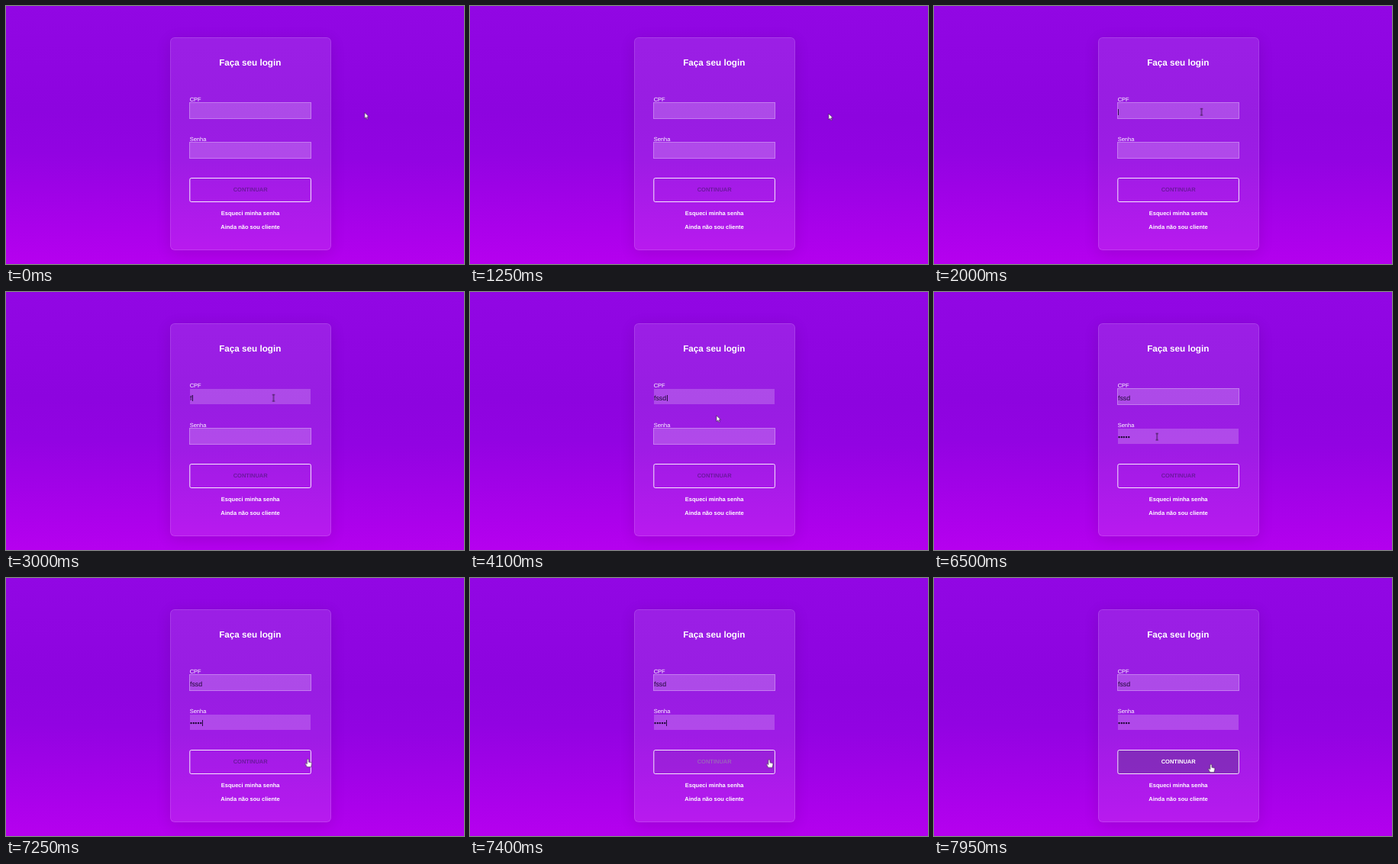
An HTML page that plays this animation: 600 px wide and 338 px high, repeating every 8 s.

```html
<!DOCTYPE html>
<html lang="pt-BR">
<head>
<meta charset="utf-8">
<title>Faça seu login</title>
<style>
html, body { margin: 0; width: 100%; height: 100%; overflow: hidden; }
body {
  position: relative;
  background: linear-gradient(181deg, #9207e4, #8d04df 42%, #9203e2 58%, #b600ef);
  font-family: "Liberation Sans", Arial, sans-serif;
}
svg { position: absolute; left: 0; top: 0; }
.card {
  position: absolute; left: 215px; top: 41px; width: 211px; height: 279px;
  box-sizing: border-box; border: 1px solid rgba(255,255,255,.22); border-radius: 6px;
  background: rgba(255,255,255,.1); background-clip: padding-box;
  box-shadow: 0 4px 20px rgba(0,0,0,.11);
}
text { fill: #fff; font-size: 7.5px; text-rendering: geometricPrecision; }
.bold { font-weight: bold; text-anchor: middle; }
.title { font-size: 11.7px; }
.field { fill: #fff; fill-opacity: .2; }
.edge { fill: none; stroke: #fff; stroke-opacity: .42; }
.button { fill: rgba(88,62,132,0); stroke: #fff; stroke-opacity: .9; }
.label { fill: #6c189f; }

/* Typed text: the right border is the caret */
.typed {
  position: absolute; left: 241px; width: 0; height: 8px;
  overflow: hidden; white-space: nowrap;
  font-size: 8.8px; line-height: 8px; color: #1c0733;
  border-right: 1px solid transparent; text-rendering: geometricPrecision;
}
.cpf { top: 135px; }
.senha { top: 186px; letter-spacing: .1px; }

.edge, .button, .label { animation: 8s ease infinite; }
.typed, .kind { animation: 8s step-end infinite; }
.edge.a { animation-name: edge-cpf; }
.edge.b { animation-name: edge-senha; }
.button { animation-name: hover; }
.label { animation-name: hover-label; }
.typed.cpf { animation-name: type-cpf, caret-cpf; }
.typed.senha { animation-name: type-senha, caret-senha; }
.cursor { animation: move 8s ease-in-out infinite; }
.kind { visibility: hidden; }
.arrow { animation-name: arrow; }
.beam { animation-name: beam; }
.hand { animation-name: hand; }

@keyframes edge-cpf {
  0%, 24.8% { stroke-opacity: .42; }
  31.9%, 58.6% { stroke-opacity: 0; }
  63.8%, 100% { stroke-opacity: .42; }
}
@keyframes edge-senha {
  0%, 58.4% { stroke-opacity: .42; }
  63.8%, 100% { stroke-opacity: 0; }
}
@keyframes hover {
  0%, 91.2% { fill: rgba(88,62,132,0); }
  97.5%, 100% { fill: rgba(88,62,132,.42); }
}
@keyframes hover-label {
  0%, 91.2% { fill: #6c189f; }
  97.5%, 100% { fill: #fff; }
}
@keyframes type-cpf {
  0% { width: 0; }
  37.3% { width: 3px; }
  40.5% { width: 7px; }
  43.6% { width: 12px; }
  46.1%, 100% { width: 17px; }
}
@keyframes type-senha {
  0% { width: 0; }
  63% { width: 3px; }
  66.1% { width: 6px; }
  69.2% { width: 10px; }
  72.4% { width: 13px; }
  74.9%, 100% { width: 16px; }
}
@keyframes caret-cpf {
  0%, 31.1%, 52.4%, 100% { border-color: transparent; }
  24.8%, 37.3% { border-color: #2a0a45; }
}
@keyframes caret-senha {
  0%, 81.1%, 93.6%, 100% { border-color: transparent; }
  58.6%, 87.3% { border-color: #2a0a45; }
}
@keyframes move {
  0%, .6% { transform: translate(469.8px, 139.5px); }
  .61%, 13.7% { transform: translate(469.8px, 140.4px); }
  15.6%, 17.5% { transform: translate(469.8px, 141px); }
  23.1%, 46.8% { transform: translate(350.5px, 138.8px); }
  56.2% { transform: translate(290px, 189px); }
  56.8%, 80.6% { transform: translate(290.7px, 189.3px); animation-timing-function: ease-in; }
  87.5% { transform: translate(384px, 211px); animation-timing-function: linear; }
  89.4% { transform: translate(397px, 226px); animation-timing-function: linear; }
  90.6% { transform: translate(395.5px, 236.8px); animation-timing-function: ease-in-out; }
  98.8%, 100% { transform: translate(362.8px, 243.8px); }
}
@keyframes arrow {
  0%, 49.8%, 83.9% { visibility: visible; }
  20.6%, 53.4%, 89.6%, 100% { visibility: hidden; }
}
@keyframes beam {
  0%, 49.8%, 83.9%, 100% { visibility: hidden; }
  20.6%, 53.4% { visibility: visible; }
}
@keyframes hand {
  0% { visibility: hidden; }
  89.6%, 100% { visibility: visible; }
}
</style>
</head>
<body>
<div class="card"></div>

<svg width="600" height="338" viewBox="0 0 600 338">
  <text class="bold title" x="319.8" y="78">Faça seu login</text>

  <text x="240.7" y="125">CPF</text>
  <rect class="field" x="241" y="127" width="158" height="20"/>
  <rect class="edge a" x="240.5" y="126.5" width="159" height="21"/>

  <text x="240.7" y="176.8">Senha</text>
  <rect class="field" x="241" y="179" width="158" height="20"/>
  <rect class="edge b" x="240.5" y="178.5" width="159" height="21"/>

  <rect class="button" x="240.8" y="225.5" width="158.6" height="31" rx="2"/>
  <text class="bold label" x="320.2" y="243.2">CONTINUAR</text>
  <text class="bold" x="320.2" y="274">Esqueci minha senha</text>
  <text class="bold" x="320" y="292">Ainda não sou cliente</text>
</svg>

<div class="typed cpf">fssd</div>
<div class="typed senha">•••••</div>

<svg width="600" height="338" viewBox="0 0 600 338">
  <g class="cursor" stroke="#2b1238" stroke-width=".6" stroke-linejoin="round">
    <path class="kind arrow" fill="#fff" d="M0 0V7.9L1.8 6.2 3.1 9 4.3 8.5 3.1 5.7H5.6Z"/>
    <path class="kind beam" fill="none" stroke-width=".9" d="M-1.6-4.2H1.6M0-4.2V4.2M-1.6 4.2H1.6"/>
    <path class="kind hand" fill="#fff" d="M-1.1.8Q0-.6 1.1.8V4.2L4.5 5Q5.3 5.2 5.1 6.2L4.3 10.8H-1.2L-3.4 6.8Q-3.5 5.7-2.6 5.7L-1.1 7Z"/>
  </g>
</svg>
</body>
</html>
```
